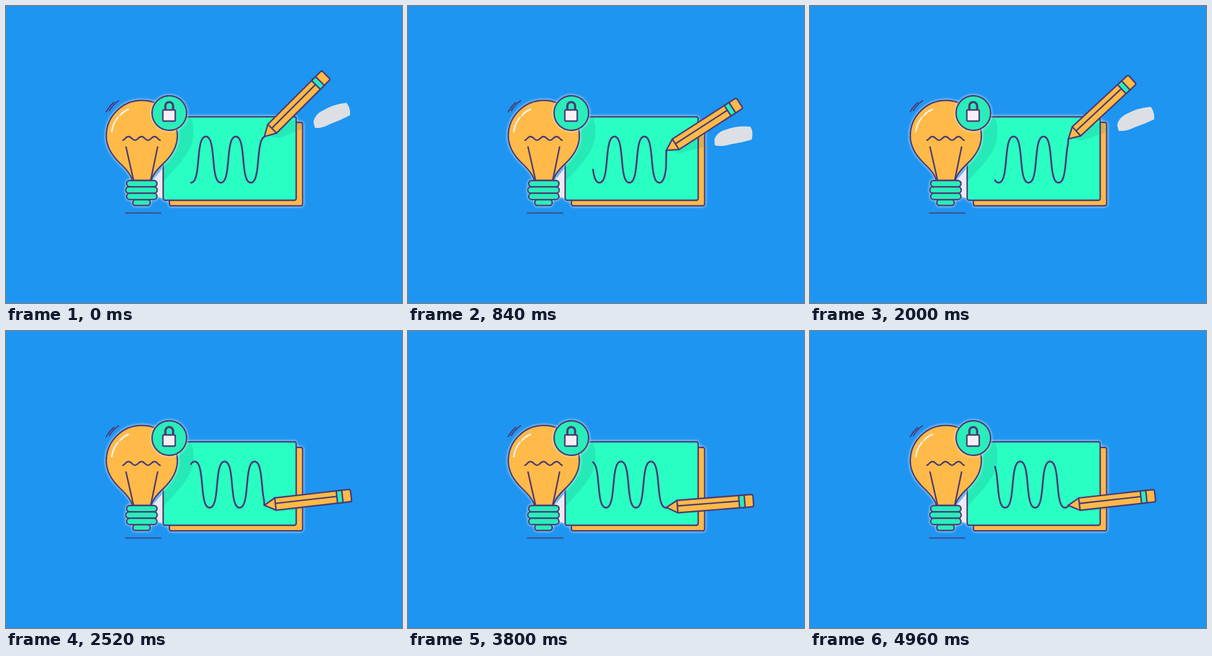
These frames come from a looping animation (640x480 px, 5060 ms). An HTML page:

```html
<!DOCTYPE html>
<html lang="en">
<head>
<meta charset="utf-8">
<title>Bulb and pencil</title>
<style>
html, body { margin: 0; width: 100%; height: 100%; overflow: hidden; background: #1e95f1; }
svg { display: block; width: 100vw; height: 100vh; }
.ink { stroke: #4b3a74; stroke-width: 2.4; stroke-linejoin: round; stroke-linecap: round; }
.orange { fill: #ffba48; }
.green { fill: #2affc3; }
.mint { fill: #2bedba; }
.line { fill: none; }
.shade { fill: #0b6a70; opacity: .14; }
</style>
</head>
<body>
<svg viewBox="0 0 640 480">
  <defs>
    <filter id="halo" x="-10%" y="-10%" width="120%" height="120%">
      <feDropShadow dx="0" dy="0" stdDeviation="2" flood-color="#e4eeff" flood-opacity=".95"/>
    </filter>
    <clipPath id="cards">
      <path d="M255 180H468V189H479V322H265V313H255Z"/>
    </clipPath>
  </defs>
  <rect width="640" height="480" fill="#1e95f1"/>
  <path id="cloud" fill="#dce0e4" d="M-30 4Q-24-8-11-10Q8-16 29-13Q34-4 30 8Q14 12-4 14Q-20 18-30 14Z"/>

  <g filter="url(#halo)">
    <path fill="#eee8f3" d="M254 261L238 281L244 290V308L254 311Z"/>
    <rect class="ink orange" x="264" y="188" width="215.5" height="135" rx="3"/>
    <rect class="ink green" x="254" y="179" width="215" height="135" rx="3"/>
  </g>
  <g clip-path="url(#cards)">
    <path class="shade" d="M255 180H298Q304 188 303 207C302 233 284 252 255 283Z"/>
    <path id="shadow" class="shade" d="M4 0L20 10H66V-8H20Z"/>
  </g>
  <path id="wave" class="ink line" style="stroke-width:2.8"/>

  <g filter="url(#halo)">
    <path class="ink orange" d="M204 282Q202 271 185 255C170 241 162 227 162 210A57.5 57.5 0 0 1 277 210C277 227 269 241 254 255Q237 271 235 282Z"/>
    <g class="ink mint">
      <rect x="205" y="313" width="28" height="9.5" rx="4"/>
      <rect x="195" y="282" width="49" height="10.3" rx="5"/>
      <rect x="193.5" y="292.3" width="51" height="10.3" rx="5"/>
      <rect x="195" y="302.6" width="49" height="10.3" rx="5"/>
    </g>
  </g>
  <g class="ink line">
    <path d="M194 228L206 281M245 228L234 281"/>
    <path d="M189 217C193 216 193 211 198 211S204 217 208.500 217S214 211 219 211S225 217 229.500 217S235 211 240 211S245 216 249 217"/>
    <path d="M162 171Q167 162 174 156M167 169Q173 159 182 153" stroke-width="2"/>
    <path d="M193 334.500H250" stroke-width="2" opacity=".85"/>
  </g>
  <path class="line" stroke="#fff3ea" stroke-width="2.6" stroke-linecap="round" d="M171 203Q173 189 181 180M184 177Q190 170 198 167"/>

  <g filter="url(#halo)">
    <circle class="ink mint" cx="264" cy="173" r="28"/>
  </g>
  <path class="line" stroke="#4b3a74" stroke-width="3.6" d="M257.500 169V161.500A6.300 6.300 0 0 1 270.100 161.500V169"/>
  <rect class="ink" fill="#f6effa" x="253.500" y="168" width="20" height="18" rx="1.5"/>

  <g id="pencil" class="ink">
    <path class="orange" d="M0 0L18-10H138Q141-10 141-7V7Q141 10 138 10H18Z"/>
    <path class="mint" d="M118-10H127V10H118Z"/>
    <path class="line" d="M18-10V10M18-1H118"/>
  </g>
</svg>
<script>
const LOOP = 5060, STEP = 40, LAST = 124;
const CYCLE = 32, PERIOD = 48.4, HALF = PERIOD / 2;
const TOP = 211, BOTTOM = 285.5, LEFT = 299, TIP = 417.5, REACH = 419;
const WAVE_EASE = 0.72, TIP_EASE = 0.9;
const el = id => document.getElementById(id);
const wave = el('wave'), pencil = el('pencil'), shadow = el('shadow'), cloud = el('cloud');

// Height (0..1) of a steep S-curve at horizontal position u
function sCurve(u, ease) {
  let lo = 0, hi = 1;
  for (let i = 0; i < 18; i++) {
    const t = (lo + hi) / 2, r = 1 - t;
    const x = 3 * ease * t * r * r + 3 * (1 - ease) * t * t * r + t * t * t;
    if (x < u) lo = t; else hi = t;
  }
  return lo * lo * (3 - 2 * lo);
}

function waveY(x, peak, ease) {
  const d = (((x - peak) % PERIOD) + PERIOD) % PERIOD;
  const u = Math.min(d, PERIOD - d) / HALF;
  return TOP + (BOTTOM - TOP) * sCurve(u, ease);
}

function place(node, x, y, angle) {
  node.setAttribute('transform', `translate(${x} ${y.toFixed(2)}) rotate(${angle.toFixed(2)})`);
}

function draw(time) {
  const step = Math.min(LAST, Math.floor((time % LOOP) / STEP));
  const tick = Math.round(step * 1.2) % CYCLE;
  const peak = 323 - PERIOD * tick / CYCLE;
  const y = waveY(REACH, peak, TIP_EASE), drop = y - TOP;

  const points = [];
  for (let x = LEFT; x < TIP; x += 0.5)
    points.push(x + ' ' + waveY(x, peak, WAVE_EASE).toFixed(2));
  points.push(TIP + ' ' + y.toFixed(2));
  wave.setAttribute('d', 'M' + points.join('L'));

  const angle = 45 - drop * 0.545;
  place(pencil, TIP, y, -angle);
  place(shadow, TIP, y, -angle * 0.45);
  place(cloud, 525, 176 + drop * 1.5, -14 + drop * 0.5);
  cloud.setAttribute('visibility', tick > 22 || tick < 4 ? 'visible' : 'hidden');
}

const start = performance.now();
function loop() {
  draw(performance.now() - start);
  requestAnimationFrame(loop);
}
loop();
</script>
</body>
</html>
```
